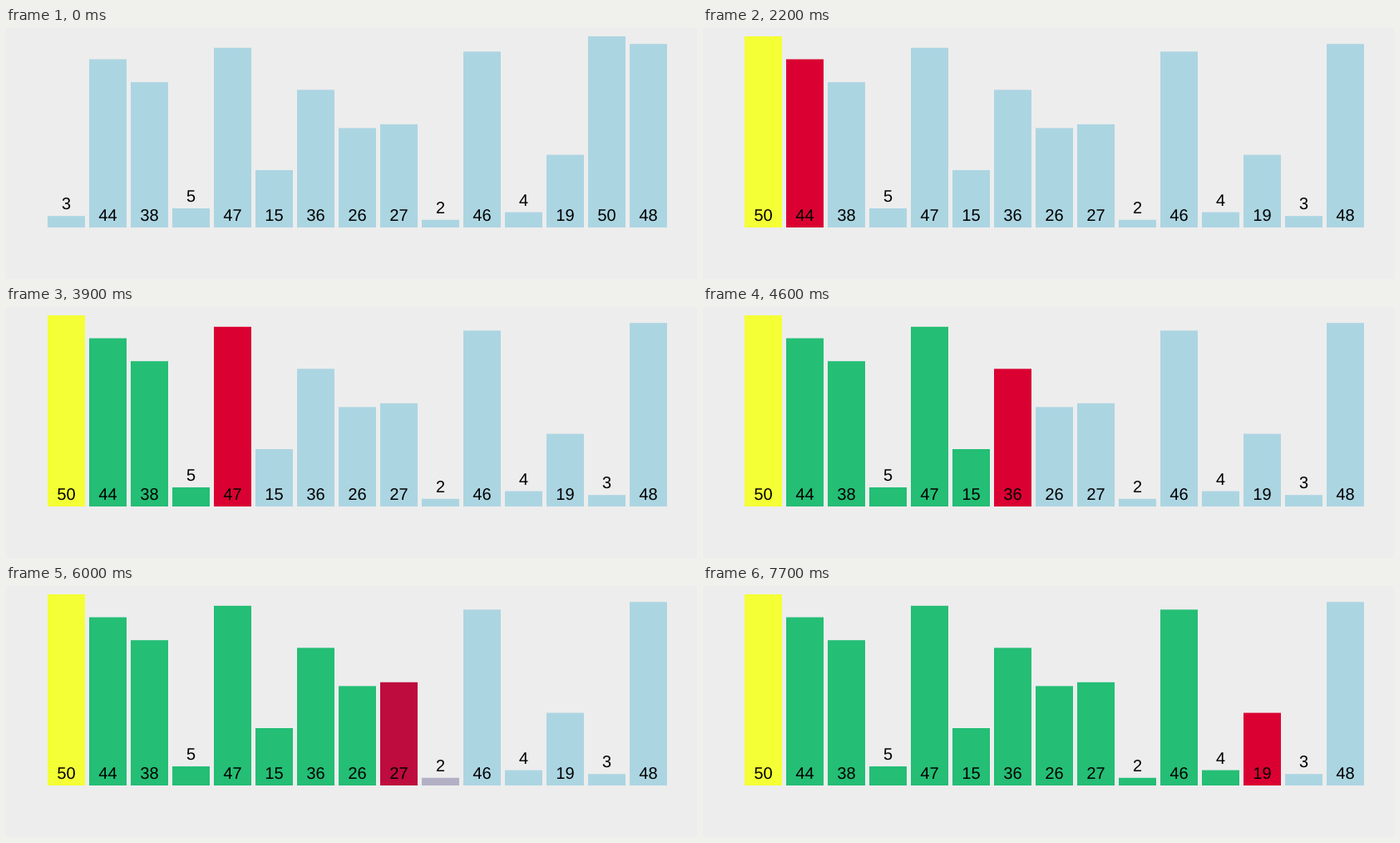
These frames come from a looping animation (831x302 px, 8 s). A matplotlib script:

```python
import matplotlib.pyplot as plt
from matplotlib.animation import FuncAnimation
from matplotlib.patches import PathPatch, Rectangle
from matplotlib.textpath import TextPath
from matplotlib.transforms import Affine2D

plt.rcParams["font.family"] = "Liberation Sans"

W, H, DPI = 831, 302, 72
STEP, FRAMES = 100, 80
VALUES = [3, 44, 38, 5, 47, 15, 36, 26, 27, 2, 46, 4, 19, 50, 48]
BASE, UNIT, BAR_W, PITCH, LEFT = 62, 4.6, 45, 50, 50
FONT, PAD = 20, 8
DIGIT_W = 0.556 * FONT
PIVOT = 13

# the algorithm takes one step per beat; each change eases in and out
FIRST_BEAT, BEAT, EASE_MS = 865, 505, 250
SWAP_DELAY = 88

BG = "#ededed"
BLUE = (172, 213, 226)
YELLOW = (244, 255, 53)
GREEN = (36, 190, 117)
RED = (218, -21, 50)  # out of gamut, clipped when shown


def ease(t):
    """Cubic in-out that settles once it is nearly done."""
    t = min(max(t, 0), 1)
    f = 4 * t**3 if t < 0.5 else 1 - 4 * (1 - t)**3
    return 1 if f > 0.95 else f


def beat(k, ms, delay=0):
    """How far the change of beat k has run."""
    return ease((ms - FIRST_BEAT - BEAT * k - delay) / EASE_MS)


def mix(a, b, f):
    return tuple(p + (q - p) * f for p, q in zip(a, b))


def bar_color(i, ms):
    if i == PIVOT:
        return mix(BLUE, YELLOW, beat(0, ms))
    if i == 0:
        return BLUE
    scanned = mix(BLUE, RED, beat(i + 1, ms))
    return mix(scanned, GREEN, beat(i + 2, ms))


def clip(color):
    return [min(max(c / 255, 0), 1) for c in color]


fig = plt.figure(figsize=(W / DPI, H / DPI), dpi=DPI, facecolor=BG)
ax = fig.add_axes([0, 0, 1, 1])
ax.set_xlim(0, W)
ax.set_ylim(0, H)
ax.axis("off")

bars, labels = [], []
for i, v in enumerate(VALUES):
    h = UNIT * v
    y = BASE + PAD + (0 if h > 30 else h)
    digits = TextPath((-DIGIT_W * len(str(v)) / 2, round(y)), str(v), size=FONT)
    bars.append(Rectangle((0, BASE), BAR_W, h, lw=0, snap=False, zorder=i + 1))
    labels.append(PathPatch(digits, fc="black", lw=0, snap=False, zorder=i + 1.5))
    ax.add_patch(bars[-1])
    ax.add_patch(labels[-1])


def draw(frame):
    ms = frame * STEP
    shift = PIVOT * beat(1, ms, SWAP_DELAY)
    moves = {0: shift, PIVOT: -shift}
    for i, (bar, label) in enumerate(zip(bars, labels)):
        x = LEFT + PITCH * (i + moves.get(i, 0))
        bar.set_x(x)
        bar.set_facecolor(clip(bar_color(i, ms)))
        label.set_transform(Affine2D().translate(x + BAR_W / 2, 0) + ax.transData)
    return bars + labels


def reset():
    return draw(0)


anim = FuncAnimation(fig, draw, frames=FRAMES, init_func=reset,
                     interval=STEP, repeat=True, repeat_delay=0)
plt.show()
```
